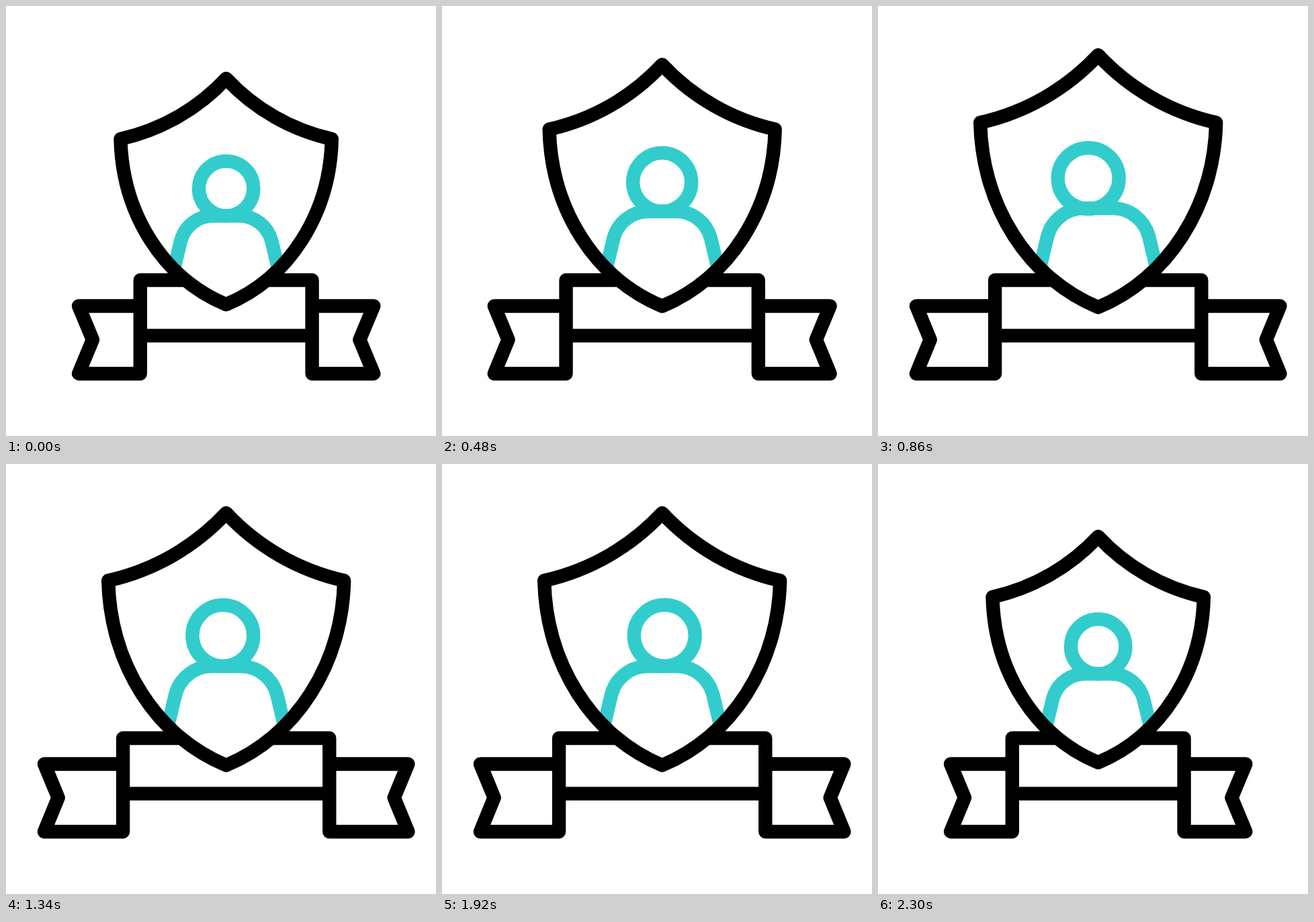
An HTML page for the animation above (2.4 s loop, 640 by 640 pixels).

```html
<!DOCTYPE html>
<html lang="en">
<head>
<meta charset="utf-8">
<title>Shield badge</title>
<style>
  html, body { margin: 0; width: 100%; height: 100%; overflow: hidden; background: #fff; }
  svg { display: block; width: 100%; height: 100%; }
  path, circle { fill: none; stroke-width: 20.4; stroke-linejoin: round; }
  .ink { stroke: #000; }
  .teal { stroke: #33cccc; }
</style>
</head>
<body>
<svg viewBox="0 0 640 640">
  <g transform="translate(327.7 408)">
    <path id="ribbon" class="ink"/>
    <path id="back" style="fill:#fff"/>
    <path id="body" class="teal"/>
    <circle id="head" class="teal"/>
    <path id="shield" class="ink"/>
  </g>
</svg>
<script>
const LOOP = 2400;
const $ = id => document.getElementById(id);
const set = (id, attrs) => {
  for (const k in attrs) $(id).setAttribute(k, attrs[k]);
};
const mix = (a, b, p) => a + (b - a) * p;

// Eased progress from 0 to 1 between two times
function ease(t, from, to) {
  const x = Math.min(1, Math.max(0, (t - from) / (to - from)));
  return x * x * (3 - 2 * x);
}

// Coordinates are relative to the middle of the ribbon's top edge
function shieldPath(s) {
  const q = (x, y) => `${x * s} ${y * s} `;
  const r = 306 * s;
  return `M${q(0, -300)}A${r} ${r} 0 0 1 ${q(-157.2, -210)}` +
    `C${q(-154.7, -98)}${q(-92.7, -2)}${q(0, 36.2)}` +
    `C${q(92.7, -2)}${q(154.7, -98)}${q(157.2, -210)}` +
    `A${r} ${r} 0 0 1 ${q(0, -300)}Z`;
}

function bodyPath(s) {
  const q = (x, y) => `${x * s} ${y * s} `;
  return `M${q(-77, -19)}L${q(-67.6, -58.5)}` +
    `C${q(-61.5, -80.5)}${q(-42, -95.7)}${q(-19.5, -95.7)}` +
    `L${q(19.5, -95.7)}` +
    `C${q(42, -95.7)}${q(61.5, -80.5)}${q(67.6, -58.5)}` +
    `L${q(77, -19)}`;
}

function ribbonPath(p) {
  const box = mix(127.9, 153.6, p);
  const tip = mix(219.6, 270.7, p);
  const notch = mix(198.7, 250, p);
  const tail = d => `M${d * box} 38.5H${d * tip}L${d * notch} 88.7` +
    `L${d * tip} 139.2H${d * box}V0H0`;
  return tail(-1) + tail(1) + `M${-box} 82.6H${box}`;
}

function draw(t) {
  const grow = ease(t, 200, 700) - ease(t, 2000, 2300);
  const scale = mix(1, 1.1165, grow);
  const left = ease(t, 700, 1000);
  const across = ease(t, 1200, 1500);
  const home = ease(t, 1700, 2000);
  const dx = -26.2 * left + 47 * across - 20.8 * home;
  const dy = 1.5 * left - 4.1 * across + 2.6 * home;

  const shield = shieldPath(scale);
  set('ribbon', { d: ribbonPath(grow) });
  set('back', { d: shield });
  set('shield', { d: shield });
  set('body', { d: bodyPath(scale) });
  set('head', { cx: dx, cy: -136.4 * scale + dy, r: 40.7 * scale });
}

const start = performance.now();
function tick() {
  draw((performance.now() - start) % LOOP);
  requestAnimationFrame(tick);
}
tick();
</script>
</body>
</html>
```
